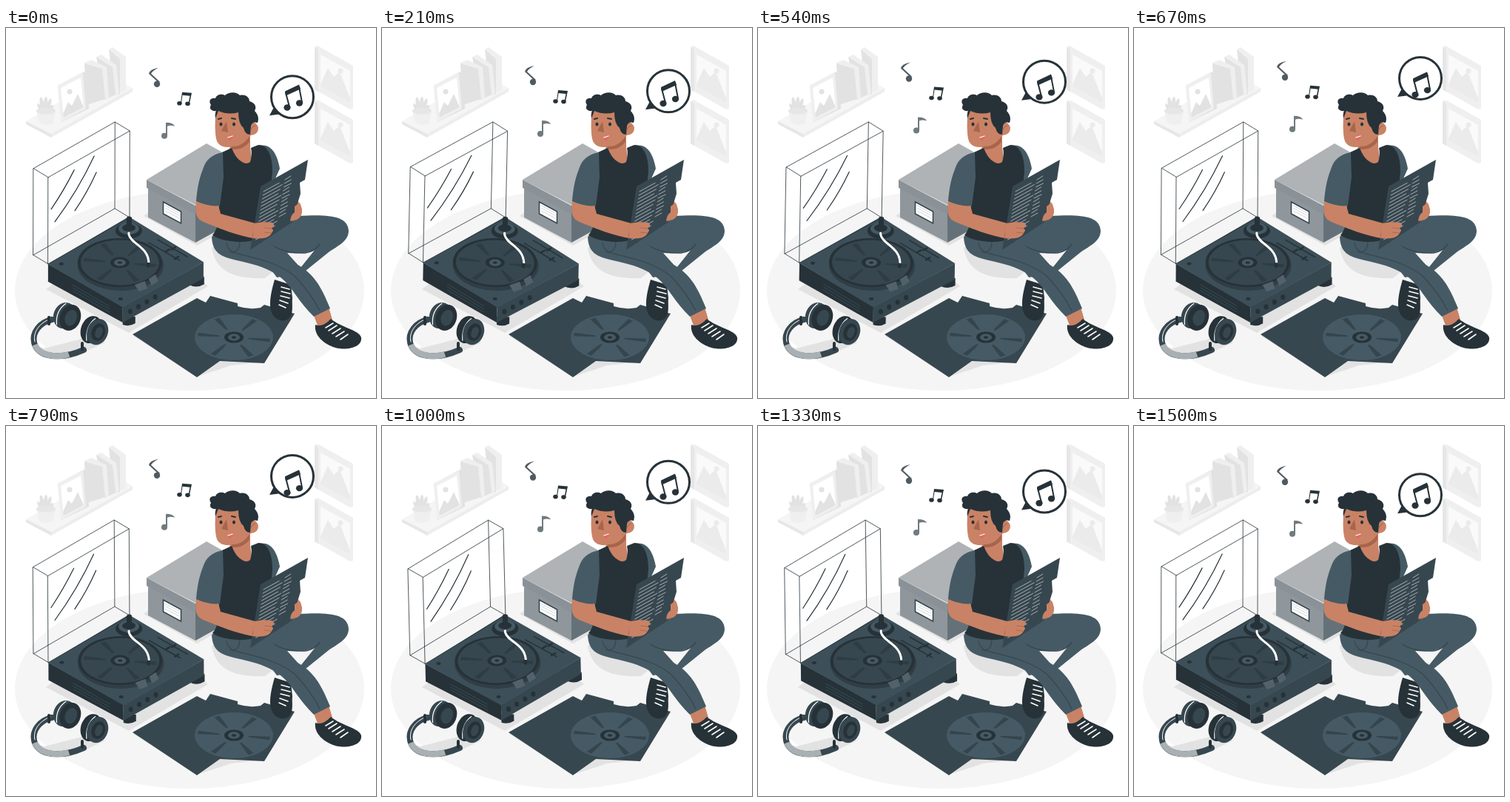
Animation of 500 by 500 pixels, one loop 1540 ms. Source, as an HTML page:

```html
<!DOCTYPE html>
<html lang="en">
<head>
<meta charset="utf-8">
<title>Listening to records</title>
<style>
html, body { margin: 0; height: 100%; overflow: hidden; background: #fff }
svg { display: block; width: 100vw; height: 100vh }
.k { fill: #263238 } .d { fill: #37474f } .m { fill: #455a64 } .s { fill: #c98265 } .g { fill: #e2e2e2 } .l { fill: #efefef }
.line { fill: none; stroke: #263238; stroke-linecap: round; stroke-linejoin: round }
.white { fill: none; stroke: #fff; stroke-linecap: round }
</style>
</head>
<body>
<svg viewBox="0 0 500 500">
<defs>
  <g id="disc">
    <circle r="53" fill="currentColor"/>
    <g id="wedges" class="k" opacity=".5"></g>
    <circle r="20" fill="currentColor"/>
    <circle r="13" class="k"/><circle r="8" class="m"/><circle r="3" class="k"/>
  </g>
  <g id="picture">
    <path class="l" d="M417 26l4-2 48 27v58l-4 1-48-27z"/>
    <path fill="#e6e6e6" d="M417 26l5 3v57l-5-3z"/>
    <path fill="#fafafa" d="M425 36l40 22v43l-40-22z"/>
    <path fill="#ebebeb" d="M425 76l10-22 8 12 8-7 14 36v6l-40-22z"/>
    <circle cx="452" cy="58" r="3.5" fill="#ebebeb"/>
  </g>
</defs>

<ellipse cx="248" cy="355" rx="236" ry="135" fill="#f5f5f5"/>

<!-- shelf -->
<path fill="#f5f5f5" d="M27 126L138 62l33 19L61 143z"/>
<path fill="#e6e6e6" d="M27 126l34 17v5l-34-18z"/>
<path fill="#ededed" d="M61 143l110-62v5L61 148z"/>
<path class="l" d="M139 29l5-3 18 13v45l-10 5z"/>
<path class="g" d="M139 29l15 13v47l-8 2z"/>
<path class="l" d="M122 39l7-3 20 14 4 38-14 7z"/>
<path class="g" d="M122 39l22 14 4 37-15 7z"/>
<path class="l" d="M106 47l10-4 20 10 3 41-29 10z"/>
<path class="g" d="M106 48l24 7 4 41-25 8z"/>
<path class="g" d="M70 78l35-19 5 3 2 47-37 18z"/>
<path class="l" d="M70 78l34-18 4 49-34 18z"/>
<path fill="#fff" d="M74 81l27-14 4 40-27 14z"/>
<path class="g" d="M77 116l7-16 5 5 8-16 8 18-27 14z"/>
<circle cx="86" cy="86" r="3.5" class="g"/>
<path class="g" d="M46 113c-6-10-4-14 0-9-2-14 3-13 5-3 1-11 6-10 5 0 4-10 8-6 4 4 7-4 4 5 0 9z"/>
<path class="l" d="M41 111l26 1-3 16q-10 6-19 0z"/>
<ellipse cx="54" cy="112" rx="13" ry="4.5" fill="#e6e6e6"/>

<use href="#picture"/><use href="#picture" y="73"/>

<!-- floor shadows -->
<g class="g">
  <path d="M186 254l10-7 92 30-30 17z"/>
  <path d="M54 353l20-15 190 3 9 8-107 63z"/>
  <path d="M278 296c4 32 30 44 72 42l25-20-50-30z"/>
  <path d="M172 416l96-46 118 24-42 58-40 4-45 15z"/>
  <path d="M34 428q15 22 50 19l22-9 28-13-12-10-70 18z"/>
</g>

<!-- storage box -->
<path fill="#8f979c" d="M192 212l64 31v47l-64-34z"/>
<path fill="#657178" d="M256 243l56-32v48l-56 31z"/>
<path fill="#afb3b6" d="M190 205l81-49 50 28-65 55z"/>
<path fill="#8a9298" d="M190 205l66 35v12l-66-36z"/>
<path fill="#737e84" d="M256 240l60-35v12l-60 35z"/>
<path d="M212.500 235l24 13v16l-24-13z" fill="#fff" stroke="#37474f" stroke-width="1.600"/>
<path d="M215 240l19 10m-19-6.500l19 10m-19-6.500l19 10" stroke="#c4c9cc" stroke-width=".8"/>

<!-- turntable -->
<g id="deck">
  <path class="k" d="M158 390h17v9q-8 5-17 2zM248 336h20v10q-10 6-20 1z"/>
  <path fill="#3d4f58" d="M57 319l109-64 101 61-109 62z"/>
  <path class="k" d="M57 319l101 58v21L57 343z"/>
  <path class="d" d="M158 377l109-61v22l-109 60z"/>
  <path d="M57 319l101 58 109-61M90 347l50 29m-50-25l50 29m-50-25l50 29" fill="none" stroke="#455a64" stroke-width=".6"/>
  <g id="knobs" class="k"></g>
  <g class="k"><ellipse cx="75" cy="319" rx="3" ry="2"/><ellipse cx="155" cy="366" rx="3" ry="2"/></g>
  <ellipse cx="155" cy="321" rx="58" ry="34" fill="#303e46"/>
  <ellipse cx="154" cy="317" rx="57" ry="33" class="k"/>
  <use href="#disc" transform="translate(154 317) scale(1 .575)" color="#37474f"/>
  <path d="M174 347l14-5 3 10-11 4zM193 339l9-6 4 9-9 6z" fill="#53626a"/>
  <ellipse cx="166" cy="274" rx="18" ry="10.500" class="k"/>
  <ellipse cx="166" cy="271" rx="14" ry="8" class="m"/>
  <ellipse cx="166" cy="270" rx="9" ry="5" class="k"/>
  <path class="k" d="M163 256q4-3 7 0v13h-7z"/>
  <path d="M166 277v2c3 13 26 16 27 38" class="white" stroke-width="3"/>
  <path class="k" d="M190 317h5l-1 7-4-1z"/>
  <path d="M193 290l42 24m-30-28l40 23" class="line" stroke-width="1.500"/>
  <path d="M216 302l5-3m7 13l5-3m-9-10l5-3" class="line" stroke-width="2.500"/>
  <path d="M57 202l110-63v117L57 319zM37 190l110-63v117L37 307zM37 190l20 12M147 127l20 12M147 244l20 12M37 307l20 12" class="line" stroke-width=".8"/>
  <path d="M92 192Q78 220 61 245M119 173Q97 220 66 262M122 195Q110 222 93 247" class="line" stroke-width="1.200"/>
</g>

<!-- headphones -->
<path d="M62 394c-17 4-27 18-24 31 4 20 35 24 67 10" class="line" style="stroke:#37474f" stroke-width="8"/>
<path d="M39 428c6 15 30 18 46 13" fill="none" stroke="#a9b0b4" stroke-width="8"/>
<path d="M60 393c-16 6-24 19-21 31" class="white" stroke-width="1"/>
<path d="M58 391v9m45 26v8" class="line" stroke-width="4"/>
<g transform="translate(83 390) rotate(20)">
  <ellipse cx="-4" rx="15" ry="18" class="d"/>
  <path d="M-8-16q-10 14-2 31" class="white" stroke-width="1.200"/>
  <ellipse cx="4" rx="14" ry="18" class="k"/><ellipse cx="5" rx="8" ry="11" class="d"/>
</g>
<g transform="translate(119 409) rotate(20)">
  <ellipse cx="-4" rx="14" ry="19" class="k"/>
  <path d="M-4-16q-9 14-1 32" class="white" stroke-width="1.200"/>
  <ellipse cx="5" rx="14" ry="18" class="d"/><ellipse cx="6" rx="9" ry="12" class="k"/><ellipse cx="7" rx="5" ry="8" class="d"/>
</g>

<!-- record sleeve -->
<path class="d" d="M171 414l87-49 12 6 6-9 37 10v4q16 5 31 2l5-4 41 12-41 67-60-3-31 22z"/>
<use href="#disc" transform="translate(308 418) scale(1 .585)" color="#455a64"/>

<!-- far leg -->
<path class="k" d="M363 340c-4 14-8 30-5 42 4 13 17 17 25 10 6-7 3-19 4-27l-2-18z"/>
<path d="M372 350l11 3m-11 3l12 3m-13 3l12 3m-13 3l11 4m-12 2l9 4" class="white" stroke-width="1.600"/>
<path class="m" d="M350 262l46-8c38-2 66-1 67 20 0 14-14 20-27 29l-36 29-34 5-30-40z"/>
<path fill="#f5f5f5" d="M380 304q25 2 38-5l-20 25z"/>
<path d="M354 289q18 16 50 15 14-2 20-12" fill="none" stroke="#37474f" stroke-width="1.500"/>

<!-- near leg -->
<path class="s" d="M415 386l21-9 5 17q-10 10-20 8z"/>
<path class="k" d="M418 401q10 4 21-8c14 12 38 15 41 25 2 14-20 18-35 14-16-5-29-17-27-31z"/>
<path d="M432 405l10-6m-6 10l11-7m-6 11l11-7m-6 11l11-7m-5 11l10-7" class="white" stroke-width="1.600"/>
<path class="m" d="M278 282c1 22 12 27 34 32 42 9 61 18 79 46 8 11 15 20 25 30l22-11c-12-30-22-46-42-58-18-10-31-21-42-36l-29-30z"/>
<path d="M316 289q0 12-9 14-8-4-9-13M302 302c35 9 67 15 89 34q22 24 33 46" fill="none" stroke="#37474f" stroke-width="1.200"/>

<!-- body -->
<path class="m" d="M342 159c16-3 24 10 28 31l-18 40-20-50z"/>
<path class="s" d="M303 158l27-16v20l3 20-18 4q-11-10-13-22z"/>
<path fill="#a9644c" d="M304 160q16 1 25-14v8q-9 11-23 10z"/>
<path class="k" d="M292 168l13-6q5 14 14 19 6 4 11 0 3-10 1-19l10-4c14 0 19 17 19 36l-8 77q-5 18-36 18-26-1-37-9 6-7 8-19z"/>
<path class="s" d="M257 233c-2 19 0 25 12 30 22 9 43 17 64 21l4-20-47-13-4-15z"/>
<path class="m" d="M293 168c-15 3-23 10-27 23-6 15-8 30-9 43q18 8 32 6l5-38z"/>

<!-- head -->
<path class="s" d="M284 108c-2 18-2 36 1 45 5 10 18 10 30 4l16-12q10-1 10-10-2-9-12-8l-6-22z"/>
<path class="k" d="M283 122q-1-6 1-10c-7 1-10-4-7-8-4-6 0-10 6-9 2-6 9-6 13-4 6-6 17-4 20 0 8-2 13 3 13 8 8 2 10 8 7 13 5 5 6 11 4 16q-7-2-9 4l-1 12q-7 0-9-9-7-5-7-21-14 4-27-2z"/>
<path fill="#a9644c" d="M298 126l-7 13 9 2z"/>
<path fill="#e9655f" d="M299 149l8-3q0 5-5 6z"/>
<path d="M300 148l6-2" class="white" stroke-width="1.300"/>
<ellipse cx="290.500" cy="130" rx="2" ry="2.600" class="k"/><ellipse cx="308" cy="130" rx="2" ry="2.600" class="k"/>
<path d="M287 123l4-1m14 0l5 1" class="line" stroke-width="2"/>
<path d="M331 137q2-5 6-5" fill="none" stroke="#a9644c"/>

<!-- album -->
<path class="s" d="M384 243l11-9 5 11q1 10-7 14l-11 3z"/>
<path class="d" d="M344 214l64-36-4 27-7 4 1 15-12 39-56 37z"/>
<path id="lyrics" class="white" stroke-width=".8" stroke-opacity=".7"/>
<path class="s" d="M335 264l13-2 12 1q5 4-1 7l2 4-4 6q-6 6-24 4z"/>
<path d="M349 270l10 1m-10 5l9 1" stroke="#a9644c" stroke-width=".8"/>
<path class="s" d="M390 241l7-5q4 8 2 15-5 8-15 10 1-9 6-12z"/>

<!-- floating notes -->
<g id="bubble">
  <path class="k" d="M356 119l7-13 9 11z"/>
  <circle cx="387" cy="94" r="28.500" fill="#fff" stroke="#263238" stroke-width="3"/>
</g>
<g id="tune">
  <path d="M378 88l5 19m13-27l4 21" class="line" stroke-width="2"/>
  <path class="k" d="M377 86l19-9 2 6-20 9z"/>
  <ellipse cx="380" cy="108" rx="4.600" ry="4.200" class="k"/><ellipse cx="396.500" cy="102" rx="4.600" ry="4.200" class="k"/>
</g>
<g id="notes">
  <g fill="#505b61"><circle cx="204" cy="76" r="4.200"/><path d="M206 74l-13-12q1-6 13-8-8 4-10 8l12 11z"/></g>
  <g class="k"><ellipse cx="234.500" cy="102" rx="3.300" ry="2.800"/><ellipse cx="245.500" cy="102.500" rx="3.300" ry="2.800"/><path d="M236 101l2-14 13 1-3 14h-1.500l2-10-10-1-1.500 10z"/></g>
  <g fill="#707a7f"><circle cx="214" cy="146" r="4"/><path d="M216 146v-18q10 0 12 5-6-2-10 0v13z"/></g>
</g>
</svg>
<script>
const $ = id => document.getElementById(id);

$('wedges').innerHTML = [8, 62, 125, 188, 242, 305].map(a =>
  `<path d="M0 0L49-4V4z" transform="rotate(${a})"/>`).join('');
$('knobs').innerHTML = [0, 1, 2, 3].map(i =>
  `<ellipse cx="${168 + i * 11.3}" cy="${383 - i * 6.5}" rx="3" ry="3.5"/>`).join('');

let lyrics = '';
for (let i = 0; i < 14; i++) {
  const x = 348 - i * .8, y = 221 + i * 5;
  const w = 21 + i * 5 % 7;
  lyrics += `M${x} ${y}l${w} ${-w * .55}`;
  if (i < 11) lyrics += `M${x + 29} ${y - 16}l${8 + i % 3} -5`;
}
$('lyrics').setAttribute('d', lyrics);

const LOOP = 1540, CYCLE = 1500, STEPS = 36;
const rise = p => 1 - Math.abs(2 * p - 1);                       // 0 -> 1 -> 0
const sway = p => p < .25 ? 4 * p : p < .75 ? 2 - 4 * p : 4 * p - 4; // 0 -> 1 -> -1 -> 0

function draw() {
  const t = performance.now() % LOOP;
  const step = Math.floor((t + 5) * STEPS / CYCLE);
  const p = (step + .5) / STEPS % 1;
  const move = (id, value) => $(id).setAttribute('transform', value);
  const lift = (id, height) => move(id, `translate(0 ${-height * rise(p)})`);
  move('deck', `rotate(${2 * sway(p)} 152 262)`);
  lift('bubble', 28.5);
  lift('tune', 19.5);
  lift('notes', 10);
  requestAnimationFrame(draw);
}
draw();
</script>
</body>
</html>
```
